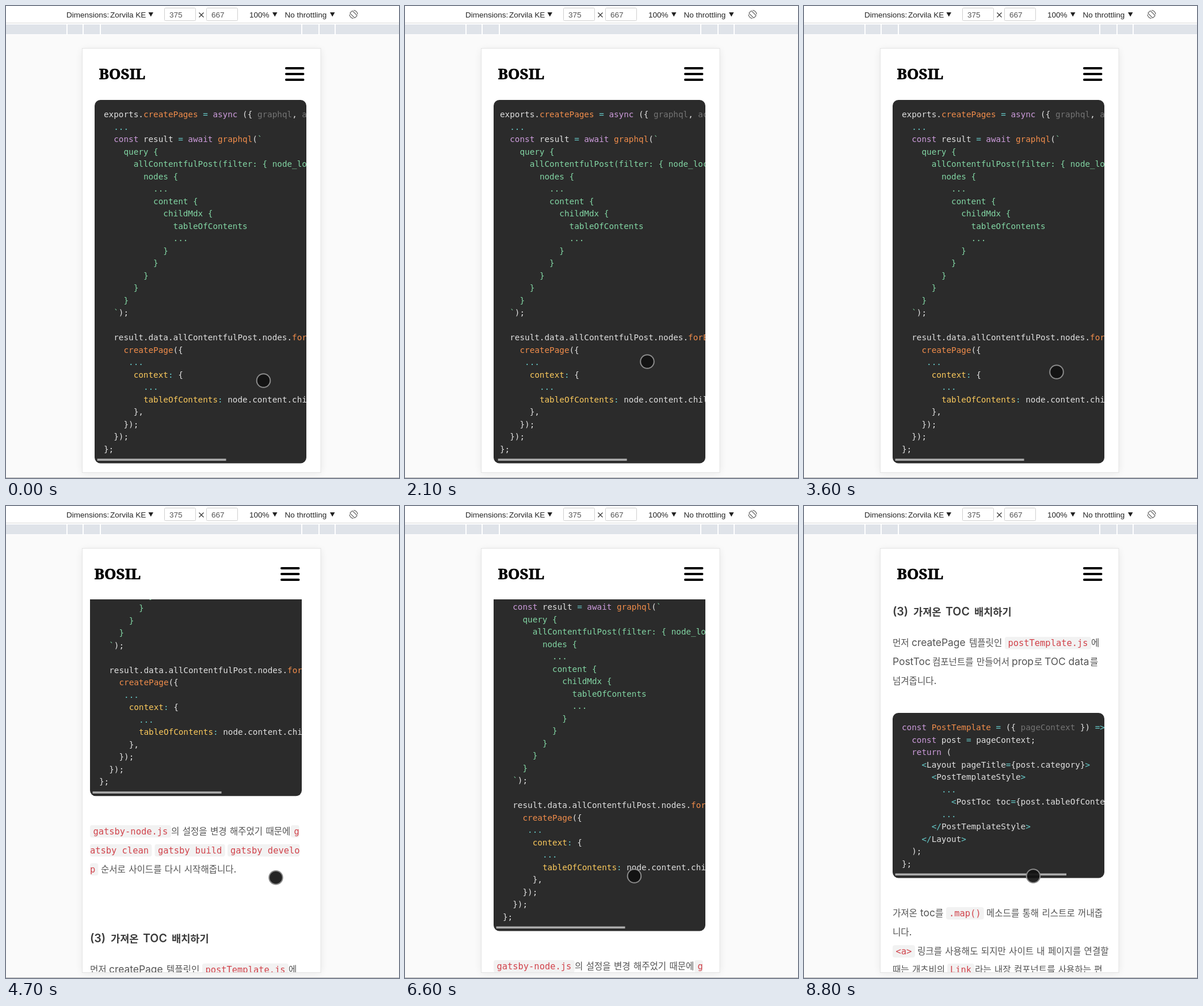
An HTML page for the animation above (8900 ms loop, 683 by 819 pixels).

```html
<!DOCTYPE html>
<html lang="ko">
<head>
<meta charset="utf-8">
<title>Mobile preview</title>
<style>
html, body { margin: 0; width: 100%; height: 100%; overflow: hidden; background: #fafafa; }
svg { display: block; }
text { white-space: pre; }
.ui { font: 13.5px "Liberation Sans", Arial, sans-serif; fill: #262626; }
.code { font: 14.3px "DejaVu Sans Mono", monospace; fill: #e0e0e0; }
.tag { font: 15.4px "DejaVu Sans Mono", monospace; fill: #d1434b; }
.ko { font: 15.55px "Noto Sans CJK KR", "Noto Sans CJK", sans-serif; word-spacing: 1px; }
.la { font: 17.4px Inter, sans-serif; }
.p { fill: #545454; }
.h { fill: #3a3a3a; }
.h .ko { font-size: 17.6px; font-weight: 700; }
.h .la { font-size: 19.6px; font-weight: 600; }
.logo { font: 900 26px "Noto Serif", serif; fill: #000; stroke: #000; stroke-width: .6; }
.k { fill: #cc9bdb; } .f { fill: #f18d4b; } .o { fill: #67cdcc; }
.s { fill: #82d6a4; } .y { fill: #fac95c; } .d { fill: #747474; }
</style>
</head>
<body>
<svg id="stage" width="100%" height="100%" viewBox="0 0 683 819">
  <defs>
    <clipPath id="view"><rect x="133" y="162" width="414" height="647"/></clipPath>
    <filter id="soft" x="-10%" y="-10%" width="120%" height="120%"><feGaussianBlur stdDeviation="7"/></filter>
  </defs>
  <rect width="683" height="819" fill="#fafafa"/>
  <rect width="683" height="50" fill="#fff"/>
  <rect y="29" width="683" height="1" fill="#d9d9d9"/>
  <rect y="32" width="683" height="17" fill="#dfe3e9"/>
  <g id="ticks" fill="#fff"></g>

  <g class="ui">
    <text x="105" y="19.5">Dimensions:</text>
    <text x="181" y="19.5">Zorvila KE</text>
    <text x="423" y="19.5">100%</text>
    <text x="484.5" y="19.5">No throttling</text>
    <g fill="#fff" stroke="#cfcfcf">
      <rect x="275.5" y="3.5" width="54" height="22" rx="2"/>
      <rect x="348.500" y="3.5" width="54" height="22" rx="2"/>
    </g>
    <text x="284" y="19.5" fill="#555">375</text>
    <text x="357" y="19.5" fill="#555">667</text>
    <path d="M335.500 11.500l8 8m0-8l-8 8" stroke="#333" stroke-width="1.2"/>
    <path d="M247.500 11h8.500l-4.250 7.500zM463 11h8.500l-4.250 7.500zM563 11h8.500l-4.250 7.500z" fill="#222"/>
  </g>
  <g transform="translate(604 14.500)" fill="none" stroke="#555" stroke-width="1.1">
    <rect x="-3" y="-6" width="6" height="12" rx="1" transform="rotate(-45)"/>
    <path d="M0 -7A7 7 0 0 1 7 0M0 7A7 7 0 0 1 -7 0"/>
  </g>

  <rect x="133" y="76" width="414" height="734" fill="#000" opacity=".08" filter="url(#soft)"/>
  <rect x="132.500" y="73.500" width="414.500" height="736" fill="#fff" stroke="#e4e4e4"/>
  <g clip-path="url(#view)"><g id="page"></g></g>
  <g id="header">
    <text class="logo" x="161.500" y="127">BOSIL</text>
    <path d="M487 108h29.500M487 118h29.500M487 128h29.500" stroke="#000" stroke-width="4" stroke-linecap="round"/>
  </g>
  <circle id="touch" r="11.800" fill="#111" fill-opacity=".92" stroke="#8b8b8b" stroke-width="2"/>
  <path id="arrow" d="M0 0V16.500L3.800 13L6.600 19.200L9.300 18L6.600 12H11.700Z" fill="#000" stroke="#fff" stroke-width="1.200"/>
  <rect y="818" width="683" height="1" fill="#b5b5b5"/>
</svg>
<script>
const LOOP = 8900, STEP = 100, LEFT = 154, WIDTH = 368, CHAR = 8.61, ROW = 21.5;
const $ = id => document.getElementById(id);
const page = $('page');

function add(parent, name, attrs = {}, content) {
  const el = document.createElementNS('http://www.w3.org/2000/svg', name);
  for (const key in attrs) el.setAttribute(key, attrs[key]);
  if (content !== undefined) el.textContent = content;
  return parent.appendChild(el);
}

for (const x of [105, 133, 163, 513, 543, 571]) add($('ticks'), 'rect', { x, y: 31, width: 2, height: 19 });

// Rows are [column, text]; "§x...§" colours a run with class x.
function codeBlock(top, rows, barWidth, base = '') {
  const height = rows.length * ROW + 28.5;
  add(page, 'rect', { x: LEFT, y: top, width: WIDTH, height, rx: 10, fill: '#2b2b2b' });
  const box = add(page, 'svg', { x: LEFT, y: top, width: WIDTH, height, overflow: 'hidden' });
  const body = add(box, 'g');
  rows.forEach(([col, line], i) => {
    const text = add(body, 'text', { class: 'code ' + base, x: 16 + col * CHAR, y: 30 + i * ROW });
    line.split('§').forEach((run, j) => {
      if (run) add(text, 'tspan', j % 2 ? { class: run[0] } : {}, j % 2 ? run.slice(1) : run);
    });
  });
  const bar = barWidth && add(box, 'rect', { x: 4.5, y: height - 8, width: barWidth, height: 3.6, fill: '#acacac' });
  return { body, bar };
}

// Alternating x, string pairs on one baseline.
function line(y, runs, cls = 'p') {
  for (let i = 0; i < runs.length; i += 2) {
    const text = add(page, 'text', { class: cls, x: runs[i], y });
    for (const part of runs[i + 1].match(/[가-힣][가-힣 ]*|[^가-힣]+/g))
      add(text, 'tspan', { class: /[가-힣]/.test(part) ? 'ko' : 'la' }, part);
  }
}

function tag(x, y, label, left = 5.5, right = 5.5) {
  const width = label.length * 9.27 + left + right;
  add(page, 'rect', { x, y: y - 16, width, height: 21.5, rx: 4, fill: '#f2f2f2' });
  add(page, 'text', { class: 'tag', x: x + left, y }, label);
}

line(-291, [154, '확인하면 post']);
line(-258, [154, 'data', 197, '형식으로', 260, 'header', 319, '를 가져온 것이 확인됩니다.']);
codeBlock(-208, [
  [1, '§dallContentfulPost§ {'], [4, '§dnodes§ {'], [6, '§dcontent§ {'], [8, '§dchildMdx§ {'],
  [10, '§ytableOfContents§'], [8, '}'], [6, '}'], [4, '}'], [2, '}']
]);
line(80, [154, '기존에', 342, '에서', 375, 'createPage', 469, '하는 곳']);
tag(201.5, 80, 'gatsby-node.js');
line(113, [154, '에다 추가해 줍니다.']);

const main = codeBlock(163, [
  [0, 'exports.§fcreatePages§ §o=§ §kasync§ ({ §dgraphql§, §dactions§ }) §o=>§ {'],
  [2, '§o...§'],
  [2, '§kconst§ result §o=§ §kawait§ §fgraphql§(§s`§'],
  [4, '§squery {§'],
  [6, '§sallContentfulPost(filter: { node_locale: { eq: "ko" } }) {§'],
  [8, '§snodes {§'], [10, '§s...§'], [10, '§scontent {§'], [12, '§schildMdx {§'],
  [14, '§stableOfContents§'], [14, '§s...§'],
  [12, '§s}§'], [10, '§s}§'], [8, '§s}§'], [6, '§s}§'], [4, '§s}§'],
  [2, '§s`§);'],
  [0, ''],
  [2, 'result.data.allContentfulPost.nodes.§fforEach§((§dnode§) §o=>§ {'],
  [4, '§fcreatePage§({'],
  [5, '§o...§'],
  [6, '§ycontext§§o:§ {'],
  [8, '§o...§'],
  [8, '§ytableOfContents§§o:§ node.content.childMdx.tableOfContents,'],
  [6, '},'], [4, '});'], [2, '});'], [0, '};']
], 224);

line(860, [295, '의 설정을 변경 해주었기 때문에']);
tag(154, 860, 'gatsby-node.js');
tag(503, 860, 'g', 5.5, 0);
tag(154, 893, 'atsby clean', 0);
tag(266.5, 893, 'gatsby build');
tag(393, 893, 'gatsby develo', 5, 0);
tag(154, 926, 'p', 0, 5);
line(926, [173, '순서로 사이드를 다시 시작해줍니다.']);

line(1047, [154, '(3)', 190, '가져온', 246, 'TOC', 296, '배치하기'], 'h');
line(1100, [154, '먼저', 187, 'createPage', 287, '템플릿인', 499, '에']);
tag(349, 1100, 'postTemplate.js');
line(1133, [154, 'PostToc', 223, '컴포넌트를 만들어서', 361, 'prop', 400, '로', 418, 'TOC data', 497, '를']);
line(1166, [154, '넘겨줍니다.']);

codeBlock(1216, [
  [0, '§kconst§ §fPostTemplate§ §o=§ ({ §dpageContext§ }) §o=>§ {'],
  [2, '§kconst§ post §o=§ pageContext;'],
  [2, '§kreturn§ ('],
  [4, '§o<§Layout pageTitle§o=§{post.category}§o>§'],
  [6, '§o<§PostTemplateStyle§o>§'],
  [8, '§o...§'],
  [10, '§o<§PostToc toc§o=§{post.tableOfContents} §o/>§'],
  [8, '§o...§'],
  [6, '§o</§PostTemplateStyle§o>§'],
  [4, '§o</§Layout§o>§'],
  [2, ');'], [0, '};']
], 297.5);

line(1569, [154, '가져온', 202, 'toc', 228, '를', 317, '메소드를 통해 리스트로 꺼내줍']);
tag(247, 1569, '.map()', 5, 5);
line(1602, [154, '니다.']);
tag(154, 1635, '<a>');
line(1635, [197, '링크를 사용해도 되지만 사이트 내 페이지를 연결할']);
line(1667, [154, '때는 개츠비의', 297, '라는 내장 컴포넌트를 사용하는 편']);
tag(249, 1667, 'Link', 5, 5);

const smooth = u => u * u * (3 - 2 * u);
const linear = u => u;
const out = u => 1 - (1 - u) ** 3;

// Keys are [time, value, easing into this key].
function at(keys, t) {
  let prev = keys[0];
  for (const key of keys) {
    if (t <= key[0]) {
      const span = key[0] - prev[0];
      const u = span ? (t - prev[0]) / span : 1;
      return prev[1] + (key[1] - prev[1]) * (key[2] || smooth)(u);
    }
    prev = key;
  }
  return prev[1];
}

const codeX = [[0, 0], [300, 110, out], [500, 110], [1000, 215], [1300, 215], [2100, 5], [2200, 0], [2700, 200], [3400, 0]];
const scrollY = [[3900, 0], [5000, 355], [6400, 355], [6500, 215, linear], [6600, 56, linear],
  [7400, -451, out], [7800, -451], [8800, 857, out]];
const shiftX = [[3900, 0], [4500, -8], [4800, -8], [5300, 7], [5700, 7], [6300, 0]];
const pointX = [[0, 447.5], [300, 444, linear], [500, 444], [2100, 421], [3600, 439], [3800, 440],
  [3900, 440], [4800, 470], [5600, 575], [5800, 598], [6300, 398.5]];
const pointY = [[0, 650], [300, 646, linear], [500, 646], [2100, 617], [3600, 635], [3800, 637],
  [3900, 637], [4800, 645], [5600, 661], [5800, 662], [6300, 642]];

function move(el, x, y) {
  el.setAttribute('transform', `translate(${x.toFixed(2)} ${y.toFixed(2)})`);
}

function draw(t) {
  const sx = at(codeX, t), shift = at(shiftX, t);
  const px = at(pointX, t), py = at(pointY, t);
  const outside = px > 547;
  move(main.body, -sx, 0);
  move(main.bar, sx * 0.626, 0);
  move(page, shift, -at(scrollY, t));
  move($('header'), shift, 0);
  move($('touch'), px, py);
  move($('arrow'), px, py);
  $('touch').style.display = outside ? 'none' : '';
  $('arrow').style.display = outside ? '' : 'none';
}

const start = performance.now();
function tick() {
  const t = (performance.now() - start) % LOOP;
  draw(Math.floor(t / STEP) * STEP);
  requestAnimationFrame(tick);
}
tick();
</script>
</body>
</html>
```
